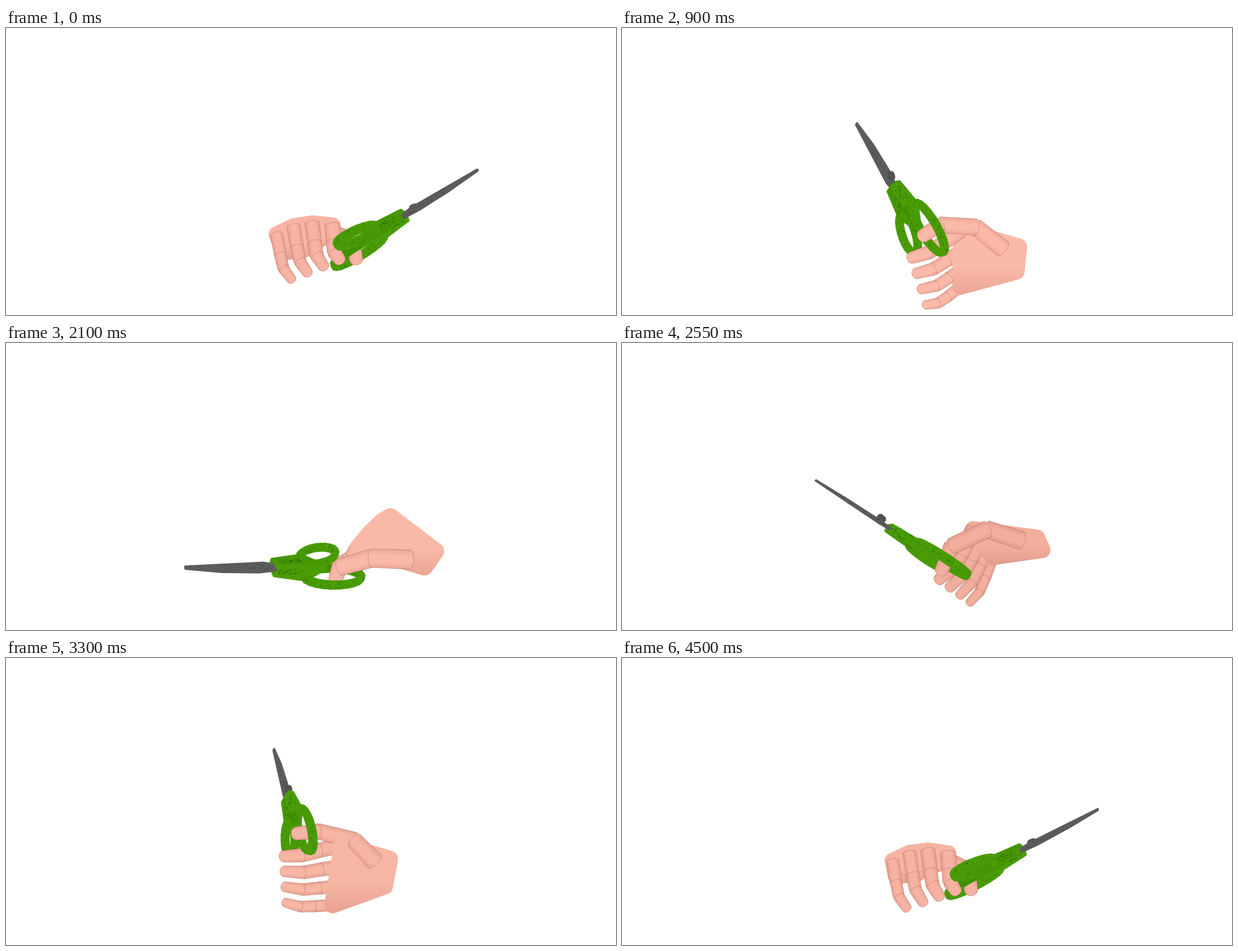
Recreate the animation shown at these times as an HTML page with a canvas. Size 1089 px wide and 514 px high, loop 4550 ms.

```html
<!DOCTYPE html>
<html lang="en">
<head>
<meta charset="utf-8">
<title>Hand with scissors</title>
<style>
html, body { margin: 0; width: 100%; height: 100%; overflow: hidden; background: #fff; }
canvas { display: block; width: 1089px; height: 514px; }
</style>
</head>
<body>
<canvas id="stage" width="1089" height="514"></canvas>
<script>
const ctx = document.getElementById('stage').getContext('2d');
const LOOP = 4550, STEP = 50, DEPTH = 1100;

// One rigid grip turned in space. Model axes: along the scissors from tip
// to handle, across the blades, and out of their plane. The handle end is 0.
// Each key: handle end on screen, then the first two axes (z points away).
const keys = [
  { time: 0,    v: [580, 418, -.83, .52, .2,   .45, .3, .84] },
  { time: 900,  v: [560, 410, .5, .84, -.2,    .57, -.48, -.66] },
  { time: 2100, v: [626, 402, .9, 0, .4,       .25, .75, -.6] },
  { time: 2900, v: [576, 416, .46, .88, 0,     .8, -.42, -.43] },
  { time: 3300, v: [534, 356, .22, .75, -.62,  .47, -.66, -.58] },
  { time: 4050, v: [532, 390, -.94, -.15, -.3, -.03, -.85, .5] }
];

const mix = (a, b, u) => a + (b - a) * u;
const mean = pts => pts[0].map((_, k) => pts.reduce((s, p) => s + p[k], 0) / pts.length);
const range = n => Array.from({ length: n }, (_, i) => i);

let seed = 71;
const rand = () => (seed = seed * 16807 % 2147483647) / 2147483647;
const jitter = size => (rand() - .5) * size;

// ---- model ----
const parts = [];

function specks(count, from, to, spread) {
  return range(count).map(() => {
    const u = rand();
    const p = from.map((n, k) => mix(n, to[k], u) + jitter(spread));
    return [p, p.map((n, k) => n + jitter(k ? 3 : 9))];
  });
}

const thick = (pts, c) => pts.flatMap(([a, b]) => [[a, b, -c], [a, b, c]]);

function addRing(a, b, ra, rb, tilt) {
  const n = 22, at = i => {
    const u = i / n * 2 * Math.PI, x = ra * Math.cos(u), y = rb * Math.sin(u);
    return [a + x * Math.cos(tilt) - y * Math.sin(tilt), b + x * Math.sin(tilt) + y * Math.cos(tilt)];
  };
  for (const i of range(n)) {
    const p = at(i), q = at(i + 1);
    parts.push({
      pts: thick([p, q], 3), r: 6, color: i % 2 ? '#489a05' : '#4a9d06',
      specks: specks(5, [...p, 0], [...q, 0], 9)
    });
  }
}

function addBody(side) {
  const shape = [[-156, 0], [-154, 15], [-126, 17], [-100, 25], [-66, 4], [-60, 0]];
  parts.push({
    pts: thick(shape.map(([a, b]) => [a, b * side]), 4), r: 2.5,
    color: side > 0 ? '#4a9d06' : '#459603',
    specks: specks(34, [-152, 7 * side, 0], [-100, 14 * side, 0], 13)
  });
}

addRing(-50, 21, 53, 19, 0);
addRing(-68, -28, 38, 18, -.3);
addBody(1);
addBody(-1);
parts.push({ pts: thick([[-32, 1], [-105, 1]], 2), r: 6, color: '#419003', specks: [] });

parts.push({
  pts: [[-298, -2, 0], [-298, 3, 0], [-242, 10, 0], [-180, 11, 0], [-150, 7, 0], [-152, -7, 0], [-169, -11, 0]],
  r: 1.6, color: '#5c5c5d', specks: specks(26, [-250, 2, 0], [-160, 0, 0], 9)
});
parts.push({ pts: [[-177, 5, -6], [-172, 3, -6]], r: 6, color: '#515153', specks: [] });

// Fingers 0 to 3 run from the little finger to the index finger.
const REACH = [-76, -34, -5, 22], CURL = [0, 8, 12, 6];
const joint = (k, j) => [
  56 - 28 * k + CURL[j],
  -54 + 25 * k - j * (2 + 5 * k),
  REACH[j] - 2 * k * (3 - k) * (3 - j)
];

function addFinger(joints, width) {
  for (const j of range(3)) {
    const pts = [joints[j], joints[j + 1]], w = width * (1 - .06 * j);
    parts.push({ pts, w, tip: j === 2 });
  }
}

const fingers = range(4).map(k => range(4).map(j => joint(k, j)));
fingers.forEach((f, k) => addFinger(f, 22 + 2.2 * k));

const thumb = [[45, 65, -95], [-15, 50, -81], [-48, 24, -28], [-40, 15, 15]];
addFinger(thumb, 32);

const wrist = [[58, 90, -106], [92, 56, -106]];
parts.push({ pts: [...fingers.map(f => f[0]), ...wrist, thumb[0]], r: 15, palm: true });

// ---- motion ----
function sample(t) {
  const n = keys.length;
  const at = i => {
    const turn = Math.floor(i / n), key = keys[i - turn * n];
    return { time: key.time + turn * LOOP, v: key.v };
  };
  let i = n - 1;
  while (keys[i].time > t) i--;
  const [a, b, c, d] = [at(i - 1), at(i), at(i + 1), at(i + 2)];
  const span = c.time - b.time, u = (t - b.time) / span, u2 = u * u, u3 = u2 * u;
  return b.v.map((p, k) => {
    const q = c.v[k];
    const m0 = (q - a.v[k]) / (c.time - a.time) * span;
    const m1 = (d.v[k] - p) / (d.time - b.time) * span;
    return (2 * u3 - 3 * u2 + 1) * p + (u3 - 2 * u2 + u) * m0 +
           (3 * u2 - 2 * u3) * q + (u3 - u2) * m1;
  });
}

const dot = (p, q) => p[0] * q[0] + p[1] * q[1] + p[2] * q[2];
const unit = p => p.map(n => n / Math.hypot(...p));
const cross = (p, q) => [p[1] * q[2] - p[2] * q[1], p[2] * q[0] - p[0] * q[2], p[0] * q[1] - p[1] * q[0]];

function view(t) {
  const v = sample(t), d = unit(v.slice(2, 5)), raw = v.slice(5);
  const lean = dot(raw, d);
  const e = unit(raw.map((n, k) => n - lean * d[k])), n = cross(d, e);
  const project = ([a, b, c]) => {
    const [x, y, z] = d.map((_, k) => a * d[k] + b * e[k] + c * n[k]);
    const s = DEPTH / (DEPTH + z);
    return [v[0] + x * s, v[1] + y * s, z, s];
  };
  return { project, facing: Math.abs(n[2]) };
}

// ---- drawing ----
function hull(pts) {
  const sorted = [...pts].sort((p, q) => p[0] - q[0] || p[1] - q[1]);
  const half = list => {
    const out = [];
    for (const p of list) {
      while (out.length > 1) {
        const [a, b] = out.slice(-2);
        if ((b[0] - a[0]) * (p[1] - a[1]) - (b[1] - a[1]) * (p[0] - a[0]) > 0) break;
        out.pop();
      }
      out.push(p);
    }
    return out.slice(0, -1);
  };
  return [...half(sorted), ...half(sorted.reverse())];
}

function blob(pts, r, color) {
  ctx.beginPath();
  for (const p of hull(pts)) ctx.lineTo(p[0], p[1]);
  ctx.closePath();
  ctx.fillStyle = ctx.strokeStyle = color;
  ctx.lineWidth = 2 * r;
  ctx.fill();
  ctx.stroke();
}

function bone([a, b], w, tip, skin) {
  const dx = b[0] - a[0], dy = b[1] - a[1], len = Math.hypot(dx, dy) || 1;
  const ux = dx / len, uy = dy / len;
  const point = (p, side, along) => [p[0] - uy * side + ux * along, p[1] + ux * side + uy * along];
  const ra = w * a[3] / 2, rb = w * b[3] / 2 * (tip ? .85 : .95);
  const start = -ra * .5, end = rb * (tip ? 1.2 : .5);
  ctx.beginPath();
  ctx.moveTo(...point(a, ra, 0));
  ctx.lineTo(...point(b, rb, 0));
  ctx.bezierCurveTo(...point(b, rb, end), ...point(b, -rb, end), ...point(b, -rb, 0));
  ctx.lineTo(...point(a, -ra, 0));
  ctx.bezierCurveTo(...point(a, -ra, start), ...point(a, ra, start), ...point(a, ra, 0));
  const g = ctx.createLinearGradient(...point(a, ra, 0), ...point(a, -ra, 0));
  g.addColorStop(0, skin.mid);
  g.addColorStop(.3, skin.light);
  g.addColorStop(.7, skin.light);
  g.addColorStop(1, skin.mid);
  ctx.fillStyle = g;
  ctx.fill();
  ctx.strokeStyle = 'rgba(150,85,70,.4)';
  ctx.lineWidth = 1;
  ctx.stroke();
}

function drawPalm(pts, r, skin) {
  const ys = pts.map(p => p[1]);
  const g = ctx.createLinearGradient(0, Math.min(...ys) - r, 0, Math.max(...ys) + r);
  g.addColorStop(0, skin.light);
  g.addColorStop(.6, skin.light);
  g.addColorStop(1, skin.mid);
  blob(pts, r, g);
}

function drawSpecks(list, project) {
  ctx.beginPath();
  for (const [p, q] of list) {
    ctx.moveTo(...project(p).slice(0, 2));
    ctx.lineTo(...project(q).slice(0, 2));
  }
  ctx.strokeStyle = 'rgba(20,50,10,.45)';
  ctx.lineWidth = 1;
  ctx.stroke();
}

function render(t) {
  const { project, facing } = view(t);
  const tone = (dark, light) => `rgb(${dark.map((n, k) => Math.round(mix(n, light[k], facing)))})`;
  const skin = {
    light: tone([239, 170, 153], [255, 191, 175]),
    mid: tone([218, 150, 134], [241, 172, 155])
  };
  ctx.fillStyle = '#fff';
  ctx.fillRect(0, 0, 1089, 514);
  ctx.lineJoin = ctx.lineCap = 'round';

  const scene = parts.map(part => {
    const pts = part.pts.map(project);
    return { part, pts, z: mean(pts)[2] };
  }).sort((p, q) => q.z - p.z);

  for (const { part, pts } of scene) {
    const scale = mean(pts)[3];
    if (part.palm) drawPalm(pts, part.r * scale, skin);
    else if (part.w) bone(pts, part.w, part.tip, skin);
    else {
      blob(pts, part.r * scale, part.color);
      drawSpecks(part.specks, project);
    }
  }
}

const begin = performance.now();
function tick() {
  const t = (performance.now() - begin) % LOOP;
  render(Math.floor(t / STEP) * STEP);
  requestAnimationFrame(tick);
}
tick();
</script>
</body>
</html>
```
